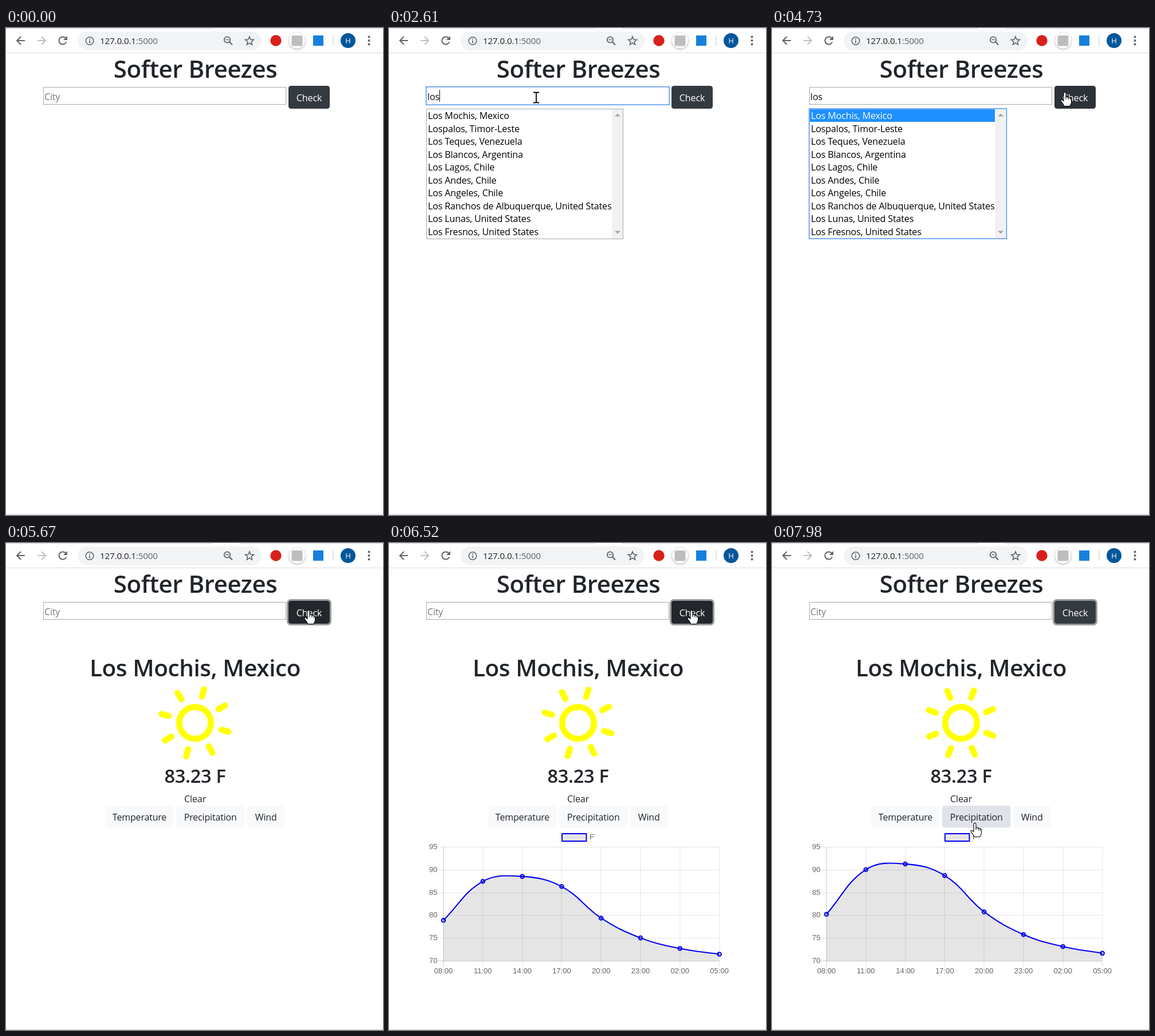
An HTML page with a canvas that plays this animation: 658x851 px, repeating every 8 s.

```html
<!DOCTYPE html>
<html lang="en">
<head>
<meta charset="utf-8">
<title>Softer Breezes</title>
<style>
html, body { margin: 0; width: 100%; height: 100%; overflow: hidden; background: #fff; }
canvas { display: block; width: 658px; height: 851px; }
</style>
</head>
<body>
<canvas id="stage"></canvas>
<script>
const W = 658, H = 851, LOOP = 8000;
const canvas = document.getElementById('stage');
const ctx = canvas.getContext('2d');
const dpr = window.devicePixelRatio || 1;
canvas.width = W * dpr;
canvas.height = H * dpr;

const UI = '"Open Sans", "Noto Sans", sans-serif';
const CHART = '"Liberation Sans", Arial, sans-serif';
const INK = '#212529', ICON = '#5f6368', BLUE = '#0000f0';

// Moments of the story, in ms
const T = { show: 130, focus: 1140, pick: 4250, press: 5040, sent: 5120, weather: 5670, chart: 6120 };
const TYPED = [[2060, 'l'], [2250, 'lo'], [2460, 'los']];
const CARET_OFF = [[1680, 2060], [3070, 3570], [4080, 4250]];

// Pointer stops: time, x, y
const PATH = [
  [130, 520, 688], [900, 257, 121], [3440, 257, 121], [3620, 233, 141],
  [3900, 233, 141], [3930, 229, 144], [4470, 229, 144], [4730, 511, 112],
  [4870, 511, 112], [4960, 528, 117], [6560, 528, 117], [7290, 188, 500],
  [7400, 188, 500], [7900, 354, 489]
];

const INPUT = [65, 103, 424, 31];
const CHECK = [493, 101, 72, 40];
const TABS = [['Temperature', 173.5, 119], ['Precipitation', 297, 119.5], ['Wind', 421, 65.5]]
  .map(([label, x, w]) => ({ label, box: [x, 459, w, 38.5] }));

const EARLY = ['Luanda, Angola', 'Lubango, Angola', 'La Plata, Argentina', 'La Rioja, Argentina',
  'Launceston, Australia', 'Linz, Austria', 'Li\u00e8ge, Belgium', 'La Paz, Bolivia',
  'Laval, Canada', 'La Crescenta, United States'];
const CITIES = ['Los Mochis, Mexico', 'Lospalos, Timor-Leste', 'Los Teques, Venezuela',
  'Los Blancos, Argentina', 'Los Lagos, Chile', 'Los Andes, Chile', 'Los Angeles, Chile',
  'Los Ranchos de Albuquerque, United States', 'Los Lunas, United States', 'Los Fresnos, United States'];

const HOURS = ['08:00', '11:00', '14:00', '17:00', '20:00', '23:00', '02:00', '05:00'];
const TEMPS = [80.2, 90, 91.25, 88.7, 80.75, 75.75, 73.1, 71.65];
const BASE = 730, LEFT = 95, STEP = 68.8, PER_DEG = 7.96;

// ---- helpers ----

function text(str, x, y, size, color, { weight = 400, align = 'left', font = UI, base = 'alphabetic' } = {}) {
  ctx.font = `${weight} ${size}px ${font}`;
  ctx.letterSpacing = font === UI ? `${-size * 0.01}px` : '0px';
  ctx.textAlign = align;
  ctx.textBaseline = base;
  ctx.fillStyle = color;
  ctx.fillText(str, x, y);
}

function fillRect(x, y, w, h, color) {
  ctx.fillStyle = color;
  ctx.fillRect(x, y, w, h);
}

function strokeRect(x, y, w, h, color, width = 1) {
  ctx.strokeStyle = color;
  ctx.lineWidth = width;
  ctx.strokeRect(x, y, w, h);
}

function rounded([x, y, w, h], r, color) {
  ctx.beginPath();
  ctx.roundRect(x, y, w, h, r);
  ctx.fillStyle = color;
  ctx.fill();
}

function disc(x, y, r, color) {
  ctx.beginPath();
  ctx.arc(x, y, r, 0, Math.PI * 2);
  ctx.fillStyle = color;
  ctx.fill();
}

function ring(x, y, r, color, width) {
  ctx.beginPath();
  ctx.arc(x, y, r, 0, Math.PI * 2);
  ctx.strokeStyle = color;
  ctx.lineWidth = width;
  ctx.stroke();
}

function line(points, color, width) {
  ctx.beginPath();
  points.forEach(([x, y]) => ctx.lineTo(x, y));
  ctx.strokeStyle = color;
  ctx.lineWidth = width;
  ctx.stroke();
}

const inside = ([x, y], [bx, by, w, h]) => x >= bx && x <= bx + w && y >= by && y <= by + h;

function mix(a, b, k) {
  return `rgb(${a.map((v, i) => Math.round(v + (b[i] - v) * k)).join()})`;
}

// ---- state from time ----

function pointer(t) {
  let i = PATH.length - 1;
  while (i > 0 && PATH[i][0] > t) i--;
  const a = PATH[i], b = PATH[i + 1] || a;
  const k = b === a ? 0 : Math.max(0, (t - a[0]) / (b[0] - a[0]));
  const e = k * k * (3 - 2 * k);
  return [a[1] + (b[1] - a[1]) * e, a[2] + (b[2] - a[2]) * e];
}

// Share of the last 150 ms spent over a box: a soft hover fade
function hover(t, box) {
  let n = 0;
  for (let k = 0; k < 5; k++) {
    const s = t - k * 30;
    if (s >= T.show && inside(pointer(s), box)) n++;
  }
  return n / 5;
}

function typed(t) {
  if (t >= T.sent) return '';
  return TYPED.reduce((s, [at, str]) => t >= at ? str : s, '');
}

// ---- browser bar ----

function drawBar() {
  fillRect(0, 0, 360, 1.5, '#dee1e6');
  fillRect(407, 0, W - 407, 1.5, '#dee1e6');
  fillRect(0, 43, W, 1, '#dadce0');
  fillRect(0, 850, W, 1, '#cccccc');
  rounded([125, 6, 321, 33], 16.5, '#f1f3f4');

  line([[33, 22], [19, 22]], ICON, 2);
  line([[26, 15], [19, 22], [26, 29]], ICON, 2);
  line([[55, 22], [69, 22]], '#bdc1c6', 2);
  line([[62, 15], [69, 22], [62, 29]], '#bdc1c6', 2);

  ctx.beginPath();
  ctx.arc(99, 22, 6.6, 0.35, Math.PI * 1.75);
  ctx.strokeStyle = ICON;
  ctx.lineWidth = 2;
  ctx.stroke();
  ctx.beginPath();
  ctx.moveTo(107, 14);
  ctx.lineTo(107, 21);
  ctx.lineTo(100, 21);
  ctx.fillStyle = ICON;
  ctx.fill();

  ring(146, 22.5, 6.8, ICON, 1.6);
  fillRect(145.2, 21.5, 1.7, 5, ICON);
  fillRect(145.2, 18.3, 1.7, 1.8, ICON);
  text('127.0.0.1', 164, 28, 15.2, '#202124');
  text(':5000', 164 + ctx.measureText('127.0.0.1').width, 28, 15.2, ICON);

  ring(386, 20.5, 5.2, ICON, 1.8);
  line([[389.8, 24.3], [395, 29.5]], ICON, 2.2);
  line([[383.3, 20.5], [388.7, 20.5]], ICON, 1.4);

  ctx.beginPath();
  for (let i = 0; i < 10; i++) {
    const r = i % 2 ? 3.4 : 7.8, a = i * Math.PI / 5;
    ctx.lineTo(425 + r * Math.sin(a), 22.8 - r * Math.cos(a));
  }
  ctx.closePath();
  ctx.strokeStyle = ICON;
  ctx.lineWidth = 1.6;
  ctx.stroke();

  disc(471, 22, 9.7, '#d8201b');
  ctx.save();
  ctx.shadowColor = 'rgba(0,0,0,.35)';
  ctx.shadowBlur = 4 * dpr;
  ctx.shadowOffsetY = dpr;
  disc(508, 22, 13.8, '#fff');
  ctx.restore();
  rounded([498.5, 13, 19, 18.5], 3, '#bdbdbd');
  fillRect(536, 13, 18, 18, '#1680de');
  fillRect(570.5, 13, 1, 18, '#c4c7cb');
  disc(597, 22, 13, '#01579b');
  text('H', 597, 27, 13, '#fff', { align: 'center' });
  [15.5, 22, 28.5].forEach(y => disc(633.5, y, 2, ICON));
}

// ---- search form ----

function drawForm(t) {
  text('Softer Breezes', 330.5, 86.5, 42, INK, { weight: 600, align: 'center' });

  const focused = t >= T.focus && t < T.pick;
  if (focused) strokeRect(64.8, 102.8, 424.4, 31.4, '#5a9bf0', 1.6);
  else strokeRect(65.5, 103.5, 423, 30, '#a9a9a9');

  const str = typed(t);
  text(str || 'City', 67, 125.5, 16, str ? '#111' : '#757575');
  const blinkOff = CARET_OFF.some(([a, b]) => t >= a && t < b);
  if (focused && !blinkOff) fillRect(str ? 67 + ctx.measureText(str).width : 67, 108, 1, 21, '#000');

  if (t >= T.press) {
    const [x, y, w, h] = CHECK;
    rounded([x - 3, y - 3, w + 6, h + 6], 7, '#9a9da0');
  }
  rounded(CHECK, 4.4, mix([52, 58, 64], [35, 39, 43], hover(t, CHECK)));
  text('Check', 529, 127.5, 16.2, '#fff', { align: 'center' });
}

function drawList(t) {
  if (t < 2310 || t >= T.sent) return;
  const early = t < 2580, items = early ? EARLY : CITIES;
  const right = early ? 295 : 409, picked = t >= T.pick;

  fillRect(65, 141, right - 65, 227, '#fff');
  if (picked) fillRect(66, 142, right - 86, 22, '#1e90ff');
  items.forEach((item, i) =>
    text(item, 68, 159 + i * 22.56, 16.1, picked && i === 0 ? '#fff' : '#000'));

  fillRect(right - 19.5, 142, 18.5, 226, '#f1f1f1');
  const cx = right - 10;
  [[154.5, -5], [354.5, 5]].forEach(([y, d]) => {
    ctx.beginPath();
    ctx.moveTo(cx - 5, y);
    ctx.lineTo(cx + 5, y);
    ctx.lineTo(cx, y + d);
    ctx.fillStyle = '#a3a3a3';
    ctx.fill();
  });
  if (picked) strokeRect(64.8, 140.8, right - 64.4, 227.4, '#5a9bf0', 1.6);
  else strokeRect(65.5, 141.5, right - 66, 227, '#a9a9a9');
}

// ---- weather ----

function drawSun(t) {
  const size = 132, s = size * 0.08, turn = (14.8 + (t - T.weather) * 0.003) * Math.PI / 180;
  ctx.save();
  ctx.translate(330, 314.3);
  ctx.lineCap = 'round';
  ring(0, 0, size * 0.25 - s / 2, '#ff0', s);
  for (let i = 0; i < 8; i++) {
    const a = turn + i * Math.PI / 4, from = size * 0.32 + s / 2, to = size * 0.5 - s / 2;
    line([from, to].map(r => [r * Math.sin(a), -r * Math.cos(a)]), '#ff0', s);
  }
  ctx.restore();
}

function drawWeather(t) {
  if (t < T.weather) return;
  text(CITIES[0], 330, 233, 40.5, INK, { weight: 600, align: 'center' });
  drawSun(t);
  text('83.23 F', 330, 419, 32.6, INK, { weight: 600, align: 'center' });
  text('Clear', 330, 453, 16.2, INK, { align: 'center' });
  TABS.forEach(({ label, box }) => {
    rounded(box, 4.4, mix([248, 249, 250], [224, 228, 233], hover(t, box)));
    text(label, box[0] + box[2] / 2, 485, 16, INK, { align: 'center' });
  });
}

const DOTS = TEMPS.map((v, i) => [LEFT + i * STEP, BASE - (v - 70) * PER_DEG]);

// Smooth curve handles around each dot, tension 0.4
const HANDLES = DOTS.map((p, i) => {
  const a = DOTS[i - 1] || p, b = DOTS[i + 1] || p;
  const before = Math.hypot(p[0] - a[0], p[1] - a[1]);
  const after = Math.hypot(b[0] - p[0], b[1] - p[1]);
  const k = 0.4 / (before + after);
  const shift = d => [p[0] + d * k * (b[0] - a[0]), p[1] + d * k * (b[1] - a[1])];
  return { back: shift(-before), ahead: shift(after) };
});

function drawChart(t) {
  if (t < T.chart) return;
  const k = Math.min(1, (t - T.chart) / 1000), grow = 1 - (1 - k) ** 4;
  const at = ([x, y]) => [x, BASE + (y - BASE) * grow];
  const end = LEFT + 7 * STEP, label = { font: CHART, base: 'middle' };

  for (let i = 0; i <= 5; i++) {
    const y = Math.round(BASE - i * 5 * PER_DEG);
    fillRect(LEFT - 10, y, end - LEFT + 10, 1, i ? 'rgba(0,0,0,.1)' : 'rgba(0,0,0,.22)');
    text(70 + i * 5, 84.5, y + 0.5, 13, '#666', { ...label, align: 'right' });
  }
  HOURS.forEach((hour, i) => {
    const x = LEFT + i * STEP;
    fillRect(Math.round(x) - 0.5, 531, 1, 210, i ? 'rgba(0,0,0,.1)' : 'rgba(0,0,0,.22)');
    text(hour, x, 748.5, 13, '#666', { ...label, align: 'center' });
  });

  const curve = () => {
    ctx.beginPath();
    ctx.moveTo(...at(DOTS[0]));
    for (let i = 1; i < DOTS.length; i++) {
      ctx.bezierCurveTo(...at(HANDLES[i - 1].ahead), ...at(HANDLES[i].back), ...at(DOTS[i]));
    }
  };
  curve();
  ctx.lineTo(end, BASE);
  ctx.lineTo(LEFT, BASE);
  ctx.fillStyle = 'rgba(0,0,0,.1)';
  ctx.fill();
  curve();
  ctx.strokeStyle = BLUE;
  ctx.lineWidth = 2.1;
  ctx.stroke();
  DOTS.map(at).forEach(([x, y]) => {
    disc(x, y, 3.3, 'rgba(0,0,0,.1)');
    ring(x, y, 3.3, BLUE, 2);
  });

  fillRect(302, 508, 42.5, 13, '#e5e5e5');
  strokeRect(302, 508, 42.5, 13, BLUE, 2);
  text('F', 350, 514.5, 13, '#666', label);
}

// ---- pointer ----

const ARROW = new Path2D('M.5 .5V17L4.3 13.4 7.3 20.4 9.9 19.3 7 12.4H12Z');
const HAND = new Path2D('M-2 1.8Q0-1.6 2 1.8V8.6Q4.4 7 6 9.6Q8.4 8.2 9.4 10.8Q11.8 10 11.6 14' +
  'V18Q11 21.5 8.8 24.5H-1.2Q-2.4 21-6.6 16.2Q-8 13-5 13.2L-2 15.6Z');
const KNUCKLES = new Path2D('M2 8.6V12.5M6 9.6V13M9.4 10.8V13.5');
const BEAM = new Path2D('M-5-8.5H-2Q0-8.5 0-7Q0-8.5 2-8.5H5M0-7V8M-5 9.5H-2Q0 9.5 0 8Q0 9.5 2 9.5H5');

function drawPointer(t) {
  if (t < T.show) return;
  const p = pointer(t);
  const overButton = inside(p, CHECK) || (t >= T.weather && TABS.some(b => inside(p, b.box)));
  ctx.save();
  ctx.translate(...p);
  ctx.strokeStyle = '#000';
  ctx.fillStyle = '#fff';
  if (inside(p, INPUT)) {
    ctx.lineWidth = 1.8;
    ctx.stroke(BEAM);
  } else {
    const shape = overButton ? HAND : ARROW;
    ctx.lineWidth = 1.1;
    ctx.lineJoin = 'round';
    ctx.fill(shape);
    ctx.stroke(shape);
    if (overButton) ctx.stroke(KNUCKLES);
  }
  ctx.restore();
}

function frame() {
  const t = performance.now() % LOOP;
  ctx.setTransform(dpr, 0, 0, dpr, 0, 0);
  fillRect(0, 0, W, H, '#fff');
  drawBar();
  drawForm(t);
  drawList(t);
  drawWeather(t);
  drawChart(t);
  drawPointer(t);
  requestAnimationFrame(frame);
}
frame();
</script>
</body>
</html>
```
